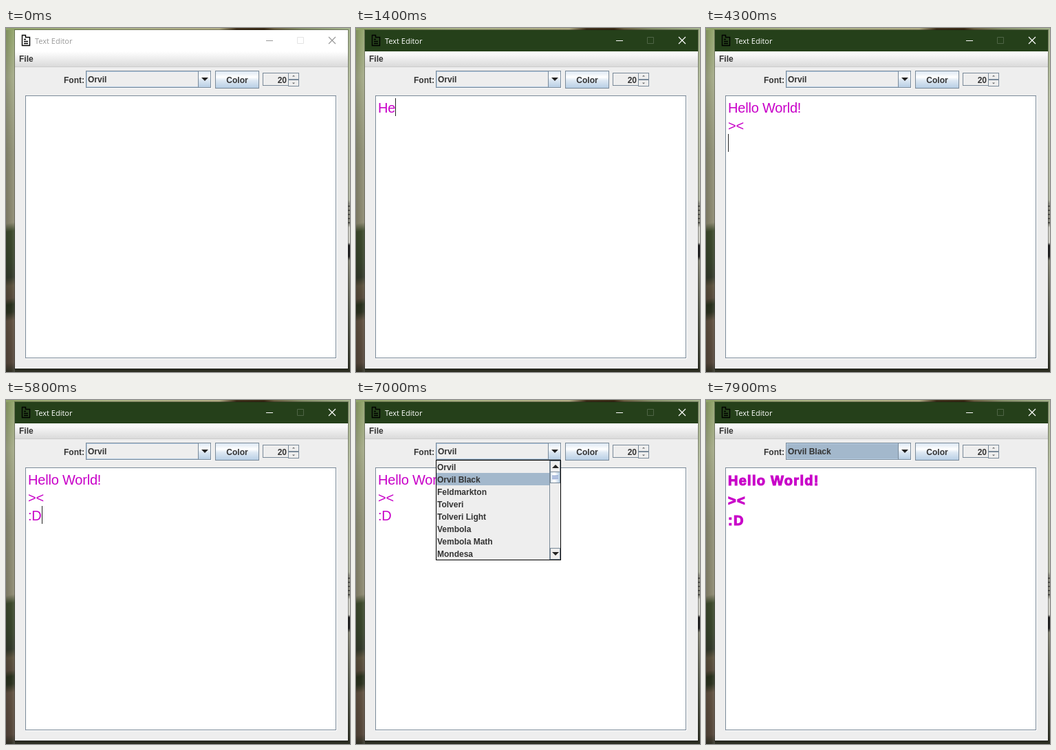
Write an HTML page that moves like this. It is 500 px wide and 500 px high and loops after 8000 ms.

```html
<!DOCTYPE html>
<html lang="en">
<head>
<meta charset="utf-8">
<title>Text Editor</title>
<style>
html, body { margin: 0; width: 100%; height: 100%; overflow: hidden; }
#stage { position: relative; width: 500px; height: 500px; overflow: hidden; background: #2c2e22;
  font: bold 12px/18px "Liberation Sans", sans-serif; color: #333; }
#stage div, #stage svg { position: absolute; box-sizing: border-box; white-space: pre; }

/* blurred desktop around the window */
.left { left: 0; top: 0; width: 13px; height: 500px;
  background: linear-gradient(90deg, #0002, #0000 60%, #fff2),
    linear-gradient(170deg, #8fa268, #a3a987 70px, #8f8f76 180px, #8b8870 280px, #3d4a2c 292px, #36422a 335px,
      #33392a 358px, #5a503c 370px, #55493a 388px, #28301c 397px, #2c3220 408px, #5f5040 420px, #54463a 480px, #2c2e22); }
.top { left: 0; top: 0; width: 500px; height: 3px;
  background: linear-gradient(90deg, #8fa268, #a9b184 150px, #b0ac84 310px, #40301a 335px, #3a2a14 375px,
    #6a5f40 390px, #86906a 430px, #a5b48c); }
.right { left: 497px; top: 0; width: 3px; height: 500px;
  background: repeating-linear-gradient(#0000 0 4px, #2228 4px 6px) 0 254px / 3px 32px no-repeat,
    linear-gradient(#a5b48c, #bcc3a8 100px, #b4b8a4 250px, #8c8c80 255px, #8c8c80 285px, #cfcfc6 290px,
      #cfcfc6 312px, #222 316px, #222 332px, #8a8a7a 338px, #55584a 420px, #2c2e22); }

.win { left: 13px; top: 3px; width: 484px; height: 492px; background: #eee; box-shadow: 0 0 0 1px #0005; }
.bar { left: 13px; top: 3px; width: 484px; height: 31px; background: #25401a; color: #fff; }
.bar.idle { background: #fff; color: #999; }
.bar span { position: absolute; left: 29px; top: 7px; font: 11px/18px "Open Sans", sans-serif; }
.bar svg { left: 0; top: 0; fill: none; stroke: currentColor; }
.icon { stroke: #000; }
.max { stroke: #4f6546; }
.idle .max { stroke: #e4e4e4; }
.menu { left: 13px; top: 34px; width: 484px; height: 23px; padding: 2px 6px; background: linear-gradient(#fff, #dadada);
  border-bottom: 1px solid #ccc; }

.edge { border: 1px solid #7a8a99; }
.blue { background: linear-gradient(#dde8f3, #fff 35%, #dde8f3 55%, #b8cfe5); }
.combo { left: 116px; top: 62px; width: 182px; height: 25px; box-shadow: inset 0 0 0 1px #b8cfe5, 1px 1px #fff; }
.combo.focus { background: #a3b8cc; }
#font { left: 2px; top: 3px; }
.drop { left: 162px; top: -1px; width: 19px; height: 25px; }
.color { left: 304px; top: 62px; width: 64px; height: 26px; line-height: 26px; text-align: center; }
.size { left: 373px; top: 65px; width: 53px; height: 19px; padding: 1px 17px 0 0; text-align: right; }
.step { left: 36px; width: 16px; height: 10px; background: #eee; }
.tri { border: solid transparent; border-width: 0 5px; }
.down { border-top: 5px solid #222; }
.up { border-bottom: 5px solid #222; }
.small { transform: scale(.4); opacity: .65; }

.pane { left: 28px; top: 98px; width: 452px; height: 382px; background: #fff; box-shadow: 1px 1px #fff; }
#doc { left: 32px; top: 102px; color: #c800c8; font: 20px/26px "Liberation Sans", sans-serif; letter-spacing: -.2px; }
#doc.black { font-weight: bold; line-height: 29px; letter-spacing: 1.27px; -webkit-text-stroke: 1.1px #c800c8; }
#text { position: relative; top: 1px; }
#caret { display: inline-block; width: 1px; height: 26px; margin-right: -1px; background: #222; vertical-align: top; }

.list { left: 116px; top: 87px; width: 182px; height: 146px; background: #eee; border: 1px solid #000; }
.item { left: 0; width: 164px; height: 18px; padding: 1px 0 0 1px; }
.item.on { background: #a3b8cc; }
.scroll { left: 164px; top: 0; width: 16px; height: 144px; border-left: 1px solid #7a8a99; }
.scroll .edge { left: 0; width: 15px; height: 17px; }
.thumb { background: linear-gradient(90deg, #dde8f3, #fff 40%, #b8cfe5); }
.grip { left: 2px; top: 5px; width: 9px; height: 6px; background: repeating-linear-gradient(#6382bf 0 1px, #fff 1px 2px); }
</style>
</head>
<body>
<div id="stage">
  <div class="left"></div><div class="top"></div><div class="right"></div>
  <div class="win"></div>
  <div class="bar" id="bar">
    <svg width="484" height="31">
      <path class="icon" stroke-width="1.4" d="M10.5 7.5H15.5V10.5H21.5V22.5H10.5ZM13 13.5H16M13 16.5H19M13 19.5H19"/>
      <path d="M365 15.5h10"/>
      <path stroke-width="1.2" d="M456 10l10 10M466 10l-10 10"/>
      <path class="max" d="M410.5 10.5h9v9h-9z"/>
    </svg>
    <span>Text Editor</span>
  </div>
  <div class="menu">File</div>
  <div style="left:84px;top:67px">Font:</div>
  <div class="combo edge" id="combo">
    <div id="font"></div>
    <div class="drop edge blue"><div class="tri down" style="left:4px;top:9px"></div></div>
  </div>
  <div class="color edge blue">Color</div>
  <div class="size edge">20
    <div class="step edge" style="top:-1px"><div class="tri up small" style="left:2px;top:1px"></div></div>
    <div class="step edge" style="top:9px"><div class="tri down small" style="left:2px;top:2px"></div></div>
  </div>
  <div class="pane edge"></div>
  <div id="doc"><span id="text"></span><span id="caret"></span></div>
  <div class="list" id="list">
    <div class="scroll">
      <div class="edge" style="top:0"><div class="tri up" style="left:2px;top:5px"></div></div>
      <div class="edge thumb" style="top:16px"><div class="grip"></div></div>
      <div class="edge" style="top:127px"><div class="tri down" style="left:2px;top:5px"></div></div>
    </div>
  </div>
</div>
<script>
const LOOP = 8000, FOCUS = 100, OPEN = 6300, HOVER = 6700, PICK = 7300;
const fonts = ["Orvil", "Orvil Black", "Feldmarkton", "Tolveri", "Tolveri Light", "Vembola", "Vembola Math", "Mondesa"];
const script = "Hello World!\n><\n:D";
// one time per typed character
const keys = [1200, 1400, 1500, 1600, 1700, 1800, 1900, 2100, 2200, 2300, 2400, 2700,
  3000, 3300, 3600, 3900, 4600, 4900];
const wakes = [FOCUS, ...keys, 5800]; // moments when the caret restarts its blink

const el = id => document.getElementById(id);
const [bar, combo, font, doc, text, caret, list] =
  ["bar", "combo", "font", "doc", "text", "caret", "list"].map(el);

const items = fonts.map((name, i) => {
  const item = document.createElement("div");
  item.className = "item";
  item.style.top = i * 18 + "px";
  item.textContent = name;
  list.append(item);
  return item;
});

function draw(t) {
  const picked = t >= PICK;
  const open = t >= OPEN && !picked;
  const wake = wakes.filter(w => w <= t).pop();
  const lit = t >= FOCUS && t < OPEN && (t - wake) % 1000 < 500;

  bar.classList.toggle("idle", t < FOCUS);
  text.textContent = script.slice(0, keys.filter(k => k <= t).length);
  caret.style.visibility = lit ? "visible" : "hidden";
  doc.classList.toggle("black", picked);
  combo.classList.toggle("focus", picked);
  font.textContent = fonts[picked ? 1 : 0];
  list.style.display = open ? "block" : "none";
  items.forEach((item, i) => item.classList.toggle("on", i === (t < HOVER ? 0 : 1)));
}

const start = performance.now();
function tick() {
  draw((performance.now() - start) % LOOP);
  requestAnimationFrame(tick);
}
tick();
</script>
</body>
</html>
```
